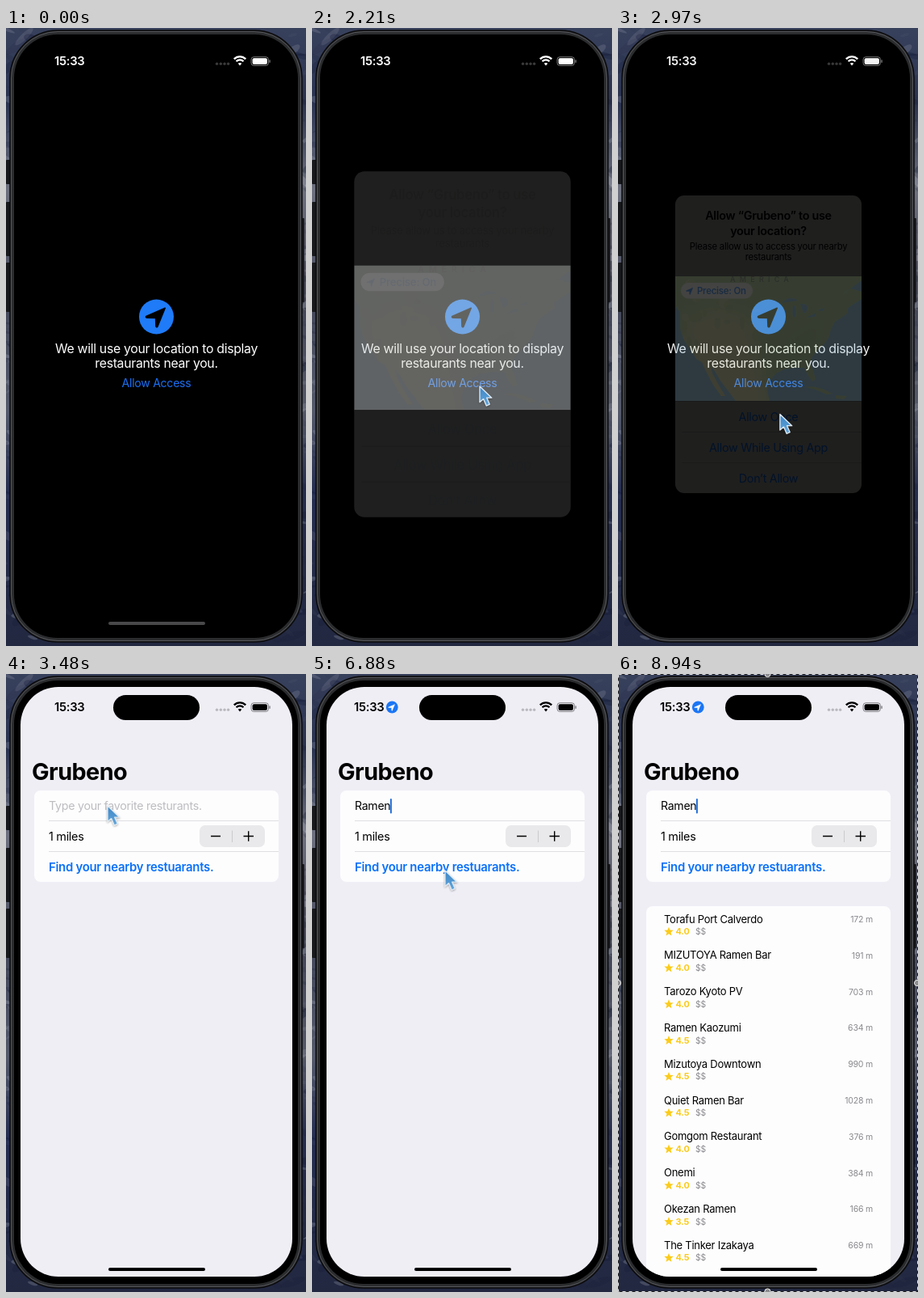
Animation of 372 by 764 pixels, one loop 8970 ms. Source, as an HTML page with a canvas:

```html
<!DOCTYPE html>
<html lang="en">
<head>
<meta charset="utf-8">
<title>Nearby restaurants</title>
<style>
html, body { margin: 0; width: 100%; height: 100%; overflow: hidden; background: #1c2340; }
canvas, svg { position: absolute; left: 0; top: 0; width: 372px; height: 764px; }
text { font-family: Inter, "Liberation Sans", sans-serif; letter-spacing: -.02em; white-space: pre; }
</style>
</head>
<body>
<canvas id="sky" width="372" height="764"></canvas>
<svg id="stage" viewBox="0 0 372 764">
  <defs>
    <clipPath id="screen"><rect x="18" y="16" width="337" height="729" rx="47"/></clipPath>
    <clipPath id="mapBox"><rect x="71" y="307" width="231" height="154"/></clipPath>
    <filter id="soft"><feGaussianBlur stdDeviation="8"/></filter>
    <filter id="drop" x="-50%" y="-50%" width="200%" height="200%">
      <feDropShadow dx="0" dy="1" stdDeviation="1.2" flood-opacity=".35"/>
    </filter>
    <linearGradient id="tip" x1="0" y1="0" x2="0" y2="1">
      <stop offset="0" stop-color="#3d86c6"/><stop offset="1" stop-color="#62a6dc"/>
    </linearGradient>
  </defs>
</svg>
<script>
const LOOP = 8970, BLUE = '#0a70f8';
const stage = document.getElementById('stage');
const $ = id => document.getElementById(id);

const text = (x, y, s, size = 14.2, fill = '#000', weight = 400, anchor = 'start', extra = '') =>
  `<text x="${x}" y="${y}" font-size="${size}" fill="${fill}" font-weight="${weight}" text-anchor="${anchor}" ${extra}>${s}</text>`;
const mid = (y, s, size, fill, weight) => text(186.5, y, s, size, fill, weight, 'middle');
const rect = (x, y, w, h, rx, fill, extra = '') =>
  `<rect x="${x}" y="${y}" width="${w}" height="${h}" rx="${rx}" fill="${fill}" ${extra}/>`;
const group = (id, body, extra = '') => `<g id="${id}" ${extra}>${body}</g>`;
const line = (d, stroke, w = 1) => `<path d="${d}" stroke="${stroke}" stroke-width="${w}" fill="none"/>`;
// Navigation arrow centred on x, y
const arrow = (x, y, k, fill) =>
  `<path transform="translate(${x} ${y}) scale(${k})" d="M11 -11 L-13 -.5 Q-14 1 -12 1.2 L-1 1.5 L-.6 12 Q0 14 1.4 12.4 Z" fill="${fill}" stroke="${fill}" stroke-width="1.5" stroke-linejoin="round"/>`;
const random = seed => () => (seed = seed * 16807 % 2147483647) / 2147483647;

function paintSky() {
  const c = $('sky').getContext('2d'), rnd = random(11);
  const g = c.createLinearGradient(0, 0, 0, 764);
  [[0, '#38415c'], [.12, '#2a3350'], [.26, '#6d717f'], [.45, '#44485a'], [.62, '#555a6b'], [.75, '#262e50'], [1, '#222840']]
    .forEach(([p, col]) => g.addColorStop(p, col));
  c.fillStyle = g;
  c.fillRect(0, 0, 372, 764);
  for (let i = 0; i < 300; i++) {
    c.fillStyle = rnd() < .45 ? `rgba(190,196,210,${rnd() * .28})` : `rgba(16,22,50,${rnd() * .35})`;
    c.beginPath();
    const edge = rnd() < .5 ? 8 : 364;
    c.ellipse(edge + (rnd() - .5) * 60, rnd() * 764, 4 + rnd() * 14, 1 + rnd() * 4, rnd() * 1.6 - .8, 0, 7);
    c.fill();
  }
}

function phone() {
  const buttons = [[163, 30], [215, 67], [290, 61]]
    .map(([y, h]) => rect(0, y, 7, h, 1, '#17181b')).join('');
  return buttons + rect(366, 235, 4, 104, 1, '#1c1d20')
    + rect(5, 3, 362, 756, 59, '#2b2c2e', 'stroke="#0b0b0d" stroke-width="1.5"')
    + rect(6.5, 4.5, 359, 753, 57.5, 'none', 'stroke="#55565a"')
    + rect(10, 8, 352, 746, 54, '#000');
}

function welcome() {
  return rect(18, 16, 337, 729, 0, '#000')
    + `<circle cx="186.5" cy="357" r="21.5" fill="#1f7bf8"/>` + arrow(186.5, 357, .98, '#000')
    + mid(401.5, 'We will use your location to display', 15.85, '#fff')
    + mid(419.8, 'restaurants near you.', 15.85, '#fff')
    + mid(444, 'Allow Access', 14.1, '#1a6ff2');
}

function form() {
  return rect(18, 16, 337, 729, 0, '#efeef5')
    + rect(133, 26, 107, 31, 15.5, '#000')
    + text(32, 130.5, 'Grubeno', 28.8, '#000', 700)
    + rect(35, 144, 303, 113, 8, '#fdfdfe')
    + line('M53 181.5H338M53 219.5H338', '#dfdfe2')
    + text(53, 168, 'Type your favorite resturants.', 14.25, '#bdbdc1', 400, 'start', 'id="hint"')
    + text(53, 168, '', 14.1, '#000', 400, 'start', 'id="query"')
    + rect(0, 154, 2, 18.5, 1, '#2470d8', 'id="caret"')
    + text(53, 206, '1 miles', 14.4)
    + rect(240, 187, 81, 27, 7, '#e9e9eb')
    + line('M280.5 193.500V208', '#cbcbce')
    + line('M254 200.500H266M294.500 200.500H307M300.700 194.300V206.700', '#000', 1.4)
    + text(53, 243.7, 'Find your nearby restuarants.', 14.95, BLUE, 600)
    + group('results', results());
}

function results() {
  const rows = [
    ['Torafu Port Calverdo', '4.0', 172], ['MIZUTOYA Ramen Bar', '4.0', 191],
    ['Tarozo Kyoto PV', '4.0', 703], ['Ramen Kaozumi', '4.5', 634],
    ['Mizutoya Downtown', '4.5', 990], ['Quiet Ramen Bar', '4.5', 1028],
    ['Gomgom Restaurant', '4.0', 376], ['Onemi', '4.0', 384],
    ['Okezan Ramen', '3.5', 166], ['The Tinker Izakaya', '4.5', 669]
  ];
  const star = Array.from({ length: 10 }, (_, i) => {
    const r = i % 2 ? 2.6 : 6, a = i * Math.PI / 5;
    return `${(63 + r * Math.sin(a)).toFixed(1)},${(318.7 - r * Math.cos(a)).toFixed(1)}`;
  }).join(' ');
  return rect(35, 287, 303, 480, 8, '#fdfdfe') + rows.map(([name, rate, dist], i) =>
    `<g transform="translate(0 ${i * 44.8})">`
    + text(57, 307.6, name, 13)
    + text(316, 307, dist + ' m', 10.5, '#8a8a8e', 400, 'end')
    + `<polygon points="${star}" fill="#fbcb1a"/>`
    + text(71.5, 322.3, rate, 10.9, '#fbcb1a', 700)
    + text(96, 322.3, '$$', 10.3, '#8a8a8e') + '</g>').join('');
}

function statusBar() {
  const arc = r => `M${290 - r * .72} ${46 - r * .76}A${r} ${r} 0 0 1 ${290 + r * .72} ${46 - r * .76}`;
  return text(60, 46.3, '15:33', 14.8, 'currentColor', 600, 'start', 'id="clock"')
    + group('located', '<circle cx="99.300" cy="41" r="7.400" fill="#1b76f5"/>' + arrow(99, 41.2, .32, '#fff'))
    + group('signal', [261.5, 266.3, 271, 275.6].map(x => `<circle cx="${x}" cy="44.300" r="1.700"/>`).join(''))
    + line(arc(10), 'currentColor', 2.3) + line(arc(6.2), 'currentColor', 2.2)
    + '<path d="M290 46.500L287.700 43.800Q290 42 292.300 43.800Z" fill="currentColor"/>'
    + rect(304, 35.7, 21.5, 10.8, 3.4, 'none', 'stroke="currentColor" opacity=".45"')
    + rect(305.6, 37.3, 18.3, 7.6, 2, 'currentColor')
    + rect(326.4, 39.3, 1.3, 3.6, .6, 'currentColor', 'opacity=".5"');
}

function alertPanel() {
  const words = mid(237.3, 'Allow “Grubeno” to use', 14.4, '#000', 600)
    + mid(256.3, 'your location?', 14.4, '#000', 600)
    + mid(273.8, 'Please allow us to access your nearby', 11.3)
    + mid(287.4, 'restaurants', 11.3)
    + ['Allow Once', 'Allow While Using App', 'Don’t Allow']
      .map((s, i) => mid(486.4 + i * 38, s, 14.3, BLUE)).join('');
  return rect(71, 207, 231, 368, 11, '#bdbdbc')
    + line('M71 461.500H302M79 499.500H302M79 537.500H302', '#a3a3a3')
    + group('words', words);
}

function terrain() {
  const land = 'M71 307H302V335L291 342 284 347 285 352 277 358 269 363 264 373 261 383 257 389 248 398 241 406 238 414 242 424 245 434 241 437 235 429 231 420 219 420 206 422 196 427 188 436 185 448 188 461H146L137 449 127 436 120 424 115 418 117 427 124 440 133 455 128 455 118 441 110 426 104 413 97 409 90 398 82 386 77 372 77 352 71 343Z';
  const water = 'M203 340Q212 330 224 337Q214 338 203 340ZM217 343Q222 341 220 357Q215 360 217 343ZM226 341Q238 340 234 350L230 353ZM233 358L246 352 244 357ZM247 349L256 346 254 350ZM302 312V326L288 322 278 330Z';
  const rnd = random(29);
  const patches = Array.from({ length: 34 }, (_, i) => {
    const x = 80 + rnd() * 95, y = 315 + rnd() * 85;
    return `<ellipse cx="${x}" cy="${y}" rx="${2 + rnd() * 7}" ry="${2 + rnd() * 6}" fill="${i % 3 ? '#b3d48a' : '#dcdfa0'}" opacity=".6"/>`;
  }).join('');
  return rect(71, 307, 231, 154, 0, '#7fc9f1')
    + `<clipPath id="land"><path d="${land}"/></clipPath>`
    + '<g clip-path="url(#land)">' + rect(71, 307, 231, 154, 0, '#b0da91')
    + '<g filter="url(#soft)"><path d="M82 362L120 348 158 358 172 392 186 470 110 480 92 410Z" fill="#e2e0a2"/>'
    + '<path d="M206 388L236 370 256 352 246 396 220 416Z" fill="#a2d388"/></g>' + patches + '</g>'
    + `<path d="${water}" fill="#7fc9f1"/>`
    + '<path d="M232 444Q246 441 266 452L258 453Q248 447 232 444ZM270 454L284 455 280 459 270 458Z" fill="#b4d98f"/>'
    + text(139, 314, 'AMERICA', 9, '#6f7d66', 600, 'start', 'style="letter-spacing:5.200px"');
}

function alertMap() {
  return rect(71, 307, 231, 154, 0, '#dedede')
    + group('terrain', terrain())
    + rect(78, 315, 89, 19.5, 9.75, '#fff')
    + group('precise', arrow(89, 325, .34, BLUE) + text(98, 329, 'Precise: On', 11.4, BLUE, 600));
}

function selection() {
  const knobs = [[185.5, 0], [0, 382], [371, 382], [185.5, 763.5]]
    .map(([x, y]) => `<circle cx="${x}" cy="${y}" r="3.600" fill="#8d8d90" stroke="#eee"/>`).join('');
  return rect(.5, .5, 371, 763, 0, 'none', 'stroke="#222"')
    + rect(.5, .5, 371, 763, 0, 'none', 'stroke="#e4e4e6" stroke-dasharray="4 4"') + knobs;
}

paintSky();
stage.insertAdjacentHTML('beforeend',
  phone()
  + '<g clip-path="url(#screen)">' + group('welcome', welcome()) + group('form', form())
  + group('status', statusBar()) + rect(127, 734, 120, 4, 2, '#000', 'id="home"')
  + rect(18, 16, 337, 729, 0, '#000', 'id="dim"') + '</g>'
  + group('alert', group('panel', alertPanel()) + group('map', alertMap(), 'clip-path="url(#mapBox)"'))
  + group('cursor', '<path d="M0 0V19.500L4.600 15.600 8.300 24 12.300 22.200 8.700 14.200H14.800Z" fill="url(#tip)" stroke="#dfe9f0" stroke-width="1.300" stroke-linejoin="round" filter="url(#drop)"/>')
  + group('selection', selection()));

const smooth = p => p * p * (3 - 2 * p);
// Rows of [time, ...values], interpolated at t
function track(rows, t, ease = p => p) {
  const i = rows.findIndex(r => r[0] > t);
  if (i === 0) return rows[0].slice(1);
  if (i < 0) return rows[rows.length - 1].slice(1);
  const a = rows[i - 1], b = rows[i], p = ease((t - a[0]) / (b[0] - a[0]));
  return a.slice(1).map((v, k) => v + (b[k + 1] - v) * p);
}

const CURSOR = [
  [250, 300, 775], [1500, 208, 443], [2250, 208, 443], [2560, 201, 478], [2960, 201, 478],
  [3440, 126, 163], [3500, 126, 163], [3700, 69, 162], [5910, 69, 162], [6560, 165, 243],
  [7600, 165, 243], [8250, 255, 400], [8600, 270, 405], [8900, 345, -30]
];
// time, scale, panel opacity, map opacity, detail opacity, dimming
const ALERT = [
  [2150, 1.2, 0, 0, 0, 0], [2210, 1.163, .16, .36, .1, 0], [2270, 1.1, .5, .75, .4, .1],
  [2350, 1.035, .9, 1, .8, .22], [2460, 1, 1, 1, 1, .26],
  [2820, 1, 1, 1, 1, .26], [3000, 1, 0, 0, 1, 0]
];
const TYPED = [[5090, 1], [5250, 2], [5420, 3], [5580, 4], [5720, 5]];

const show = (id, on) => $(id).style.display = on ? '' : 'none';
const fade = (id, v) => $(id).setAttribute('opacity', v);

function draw(t) {
  const light = t >= 3000, found = t >= 6760;
  show('welcome', !light);
  show('form', light);
  show('results', t >= 7300);
  show('located', found);
  $('status').style.color = light ? '#000' : '#fff';
  $('signal').setAttribute('fill', light ? '#b9b9be' : '#3a3a3c');
  $('clock').setAttribute('x', found ? 52 : 60);
  show('home', light || t < 2100);
  $('home').setAttribute('fill', light ? '#000' : '#48484a');

  const [scale, panel, map, detail, dim] = track(ALERT, t);
  show('alert', t > 2150 && t < 3000);
  $('alert').setAttribute('transform', `translate(186.5 391) scale(${scale}) translate(-186.5 -391)`);
  fade('panel', panel);
  fade('map', map);
  ['words', 'terrain', 'precise'].forEach(id => fade(id, detail));
  fade('dim', dim);

  const n = TYPED.filter(r => r[0] <= t).length;
  const query = $('query');
  query.textContent = 'Ramen'.slice(0, n);
  show('hint', n === 0);
  show('caret', t >= 4640);
  if (light) $('caret').setAttribute('x', n ? 52.5 + query.getComputedTextLength() : 52.5);

  const [x, y] = track(CURSOR, t, smooth);
  $('cursor').setAttribute('transform', `translate(${x} ${y})`);
  show('selection', t >= 8580);
}

function tick() {
  draw(performance.now() % LOOP);
  requestAnimationFrame(tick);
}
tick();
</script>
</body>
</html>
```
